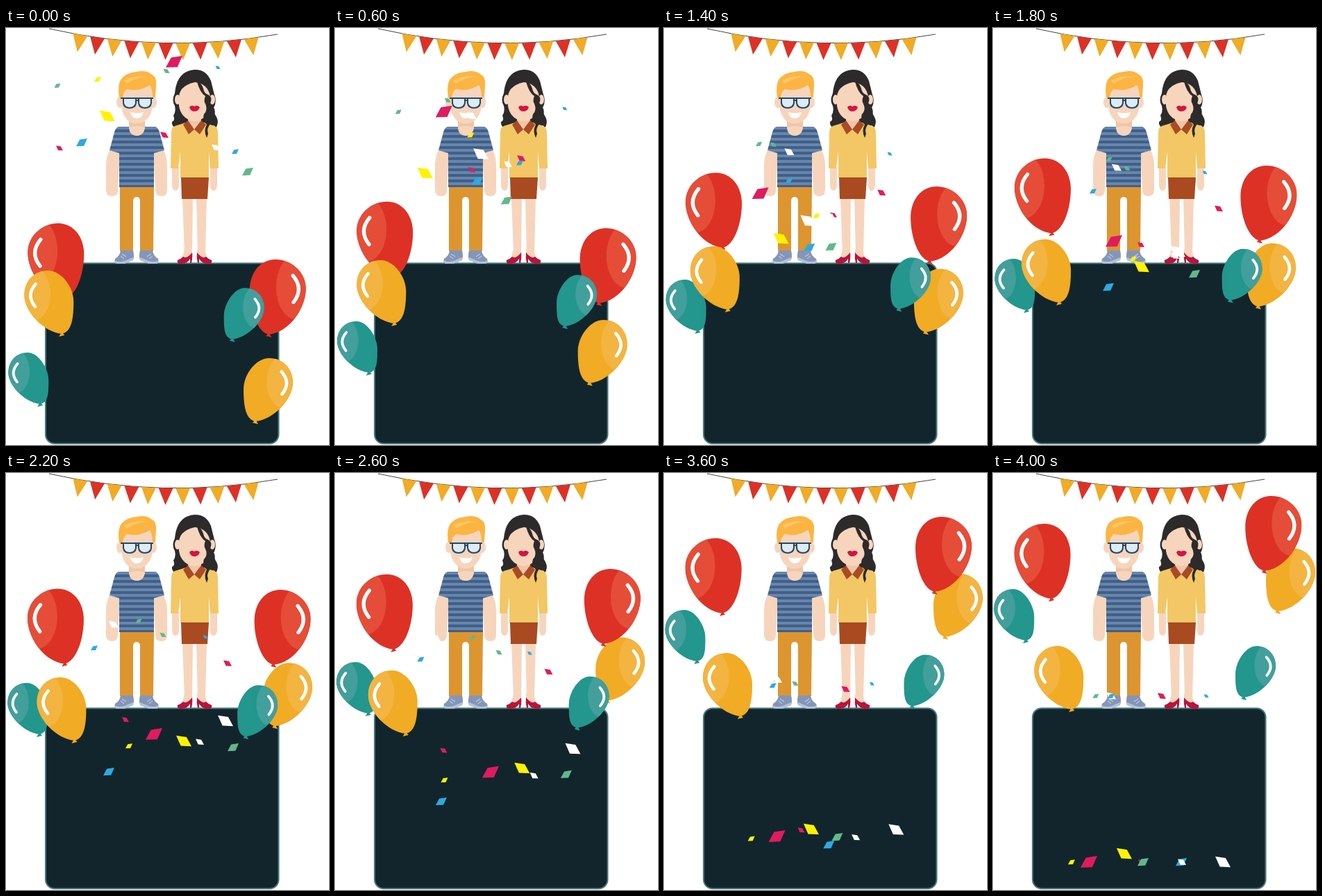
Animation, 465 px wide and 600 px high, one loop 4200 ms. Source, as an HTML page:

```html
<!DOCTYPE html>
<html lang="en">
<head>
<meta charset="utf-8">
<title>Party</title>
<style>
  html, body { margin: 0; width: 100%; height: 100%; overflow: hidden; background: #fff; }
  svg { display: block; }
</style>
</head>
<body>
<svg id="stage" width="465" height="600" viewBox="0 0 465 600">
  <defs>
    <pattern id="stripes" y="142" width="8" height="8" patternUnits="userSpaceOnUse">
      <path fill="#6686ae" d="M0 0h8v8H0z"/>
      <path fill="#425f86" d="M0 4h8v4H0z"/>
    </pattern>
    <g id="sneaker">
      <path fill="#8496b8" d="M165 320H183Q185 328 183 334L170 339H160Q155 338 157 332Q164 328 165 320Z"/>
      <path fill="#b5c1d8" d="M156 334Q162 338 171 335L183 330V334L171 339H160Q156 339 156 334Z"/>
      <path fill="none" stroke="#d5ddea" d="M167 325l6 4M165 328l5 4"/>
    </g>
    <g id="pump">
      <path fill="#f7d5bd" d="M257 318H268V328L261 335L253 333Z"/>
      <path fill="#b8143b" d="M268 323Q269 331 267 338H265V332Q261 339 254 339H249Q246 338 247 334Q251 333 255 329Q260 333 268 323Z"/>
    </g>
  </defs>

  <g id="banner"></g>
  <rect x="57" y="338.5" width="335.5" height="259.5" rx="13" fill="#12252d" stroke="#4a7b7b" stroke-width="2"/>

  <g id="man">
    <g fill="#f7d5bd">
      <path d="M149 176Q144 186 144 198V233Q144 242 153 242Q161 242 161 233L164 178Z"/>
      <path d="M227 176Q232 186 232 198V233Q232 242 224 242Q215 242 215 233L212 178Z"/>
    </g>
    <path fill="#dd9530" d="M164 227H213L212 321H193V249Q193 243 188 243Q183 243 183 249V321H164Z"/>
    <path fill="url(#stripes)" d="M162 142H215Q219 143 221 150L228 176L213 180V229H163V180L149 176L156 150Q158 143 162 142Z"/>
    <path fill="#f0c6a6" d="M177 128H200V144Q198 155 188 155Q178 155 177 144Z"/>
    <path fill="#f7d5bd" d="M177 143Q188 139 200 143Q198 155 188 155Q179 155 177 143Z"/>
    <g fill="#f7d5bd">
      <ellipse cx="164" cy="107" rx="5" ry="8"/>
      <ellipse cx="212" cy="107" rx="5" ry="8"/>
      <path d="M166 82H211V112Q209 130 196 136Q188 139 180 136Q168 130 166 112Z"/>
    </g>
    <path fill="#fcb542" d="M163 100Q160 80 167 72Q174 64 188 63Q202 60 210 67Q217 70 216 82L215 100L211 99Q211 88 207 82Q193 92 174 88Q169 91 168 100Z"/>
    <path fill="#fdc765" d="M170 76Q184 67 204 70Q190 70 174 80Z"/>
    <g fill="#dcecf2" stroke="#24486a" stroke-width="2">
      <path d="M169 101H187V108Q186 115 178 115Q170 115 169 108Z"/>
      <path d="M191 101H209V108Q208 115 200 115Q192 115 191 108Z"/>
      <path d="M165 101H212M187 105Q189 103 191 105"/>
    </g>
    <path fill="#fff" d="M179 121Q188 124 198 121Q196 130 188 130Q181 130 179 121Z"/>
    <use href="#sneaker"/>
    <use href="#sneaker" transform="matrix(-1 0 0 1 376 0)"/>
  </g>

  <g id="woman">
    <path fill="#2d2a2b" d="M271 60Q288 59 295 76L300 96Q304 105 299 115Q299 122 303 128Q307 136 302 143Q299 137 295 144H247Q238 143 239 135Q244 133 241 126Q245 121 243 112Q238 104 243 94Q246 62 271 60Z"/>
    <g fill="#f7d5bd">
      <path d="M239 200H249V228Q248 234 244 234Q239 233 239 226Z"/>
      <path d="M294 200H304V226Q304 233 299 234Q295 234 294 228Z"/>
      <path d="M254 244H269L268 325H257Z"/>
      <path d="M274 244H289L287 325H276Z"/>
    </g>
    <path fill="#f3c765" d="M259 136H285L300 141Q305 143 305 151L306 202H294L292 178V216H251V178L248 202H237L238 151Q238 143 243 141Z"/>
    <path fill="#a94a21" d="M252 215H292L290 246H253Z"/>
    <path fill="#f0c6a6" d="M262 125H281V136L271 147L262 136Z"/>
    <path fill="#a84b27" d="M262 133L271 146L263 153L255 139ZM281 133L271 146L279 153L288 139Z"/>
    <g fill="#f7d5bd">
      <ellipse cx="247" cy="103" rx="4" ry="7"/>
      <ellipse cx="297" cy="103" rx="4" ry="7"/>
      <path d="M249 99Q250 83 272 78Q291 80 294 99V112Q292 126 280 132Q271 136 263 132Q251 126 249 112Z"/>
    </g>
    <path fill="#2d2a2b" d="M275 77Q281 78 284 87Q285 94 291 96Q298 99 294 109Q303 116 300 125Q307 133 303 143Q299 138 295 137Q288 145 291 152L289 158Q284 148 289 139Q282 132 285 124Q291 118 287 109Q284 105 287 98Q279 93 275 77Z"/>
    <path fill="#d5143f" d="M264 114Q267 110 271 113Q275 110 279 114Q277 120 271 120Q266 120 264 114Z"/>
    <use href="#pump"/>
    <use href="#pump" transform="matrix(-1 0 0 1 543 0)"/>
  </g>

  <g id="balloons"></g>
  <g id="confetti"></g>
</svg>

<script>
const LOOP = 4200, STEP = 200;
const RED = '#dd3126', YELLOW = '#f1ab25', TEAL = '#23968d';
const LIGHT = { [RED]: '#e54d38', [YELLOW]: '#f3b441', [TEAL]: '#429f9b' };

function add(parent, tag, attrs) {
  const el = document.createElementNS('http://www.w3.org/2000/svg', tag);
  for (const key in attrs) el.setAttribute(key, attrs[key]);
  return parent.appendChild(el);
}
const byId = id => document.getElementById(id);

// Bunting: flags hang at right angles to a sagging string
function sag(x) {
  const u = (x - 62) / 329, v = 1 - u;
  return v * v + 76 * u * v + 9 * u * u;
}
const banner = byId('banner');
add(banner, 'path', { d: 'M62 1Q226.5 38 391 9', fill: 'none', stroke: '#444' });
for (let i = 0; i < 11; i++) {
  const x = 107 + i * 24.6, a = sag(x - 10.5), b = sag(x + 10.5);
  const slope = (b - a) / 21;
  add(banner, 'path', {
    d: `M${x - 10.5} ${a}L${x + 10.5} ${b}L${x - slope * 25} ${sag(x) + 24.5}Z`,
    fill: i % 2 ? RED : YELLOW
  });
}

// Balloons: size, top centre of the knot, then drift over 4 s
const SIZES = {
  [RED]: { w: 81, h: 108, top: .54, tip: .66, side: .41 },
  [YELLOW]: { w: 71, h: 91, top: .48, tip: .76, side: .49 },
  [TEAL]: { w: 58, h: 74, top: .48, tip: .79, side: .54 }
};
const balloons = [
  { color: RED, x: 31.3, y: 281, dx: -.7, dy: -208 },
  { color: TEAL, x: 3.3, y: 467, dx: -2, dy: -300 },
  { color: YELLOW, x: 26.3, y: 349, dx: 33, dy: -100 },
  { color: YELLOW, x: 342, y: 475, dx: 51, dy: -367, flip: true },
  { color: RED, x: 350.7, y: 333, dx: 12.5, dy: -300, flip: true },
  { color: TEAL, x: 313.7, y: 374, dx: 35.3, dy: -125, flip: true }
];

balloons.forEach((b, i) => {
  const { w, h, top, tip, side } = SIZES[b.color];
  const p = (x, y) => `${x * w} ${y * h} `;
  const body = `M${p(top, 0)}C${p(top + .27, 0)}${p(1, side - .23)}${p(1, side)}`
    + `C${p(1, side + .27)}${p(tip + .2, .97)}${p(tip, 1)}`
    + `C${p(tip - .38, .97)}${p(0, .64)}${p(0, .39)}`
    + `C${p(0, .17)}${p(top - .28, 0)}${p(top, 0)}Z`;
  b.el = add(byId('balloons'), 'g', {});
  const g = add(b.el, 'g', { transform: b.flip ? `matrix(-1 0 0 1 ${w} 0)` : '' });
  add(add(g, 'clipPath', { id: 'clip' + i }), 'path', { d: body });
  add(g, 'path', { d: `M${tip * w} ${h - 3}l-4 7l8 -2Z`, fill: b.color });
  add(g, 'path', { d: body, fill: b.color });
  add(g, 'ellipse', {
    cx: .17 * w, cy: .37 * h, rx: .36 * w, ry: .43 * h,
    fill: LIGHT[b.color], 'clip-path': `url(#clip${i})`
  });
  add(g, 'path', {
    d: `M${p(.23, .215)}Q${p(.03, .39)}${p(.22, .57)}`,
    fill: 'none', stroke: '#fff', 'stroke-width': w * .065, 'stroke-linecap': 'round'
  });
});

// Confetti: colour, half size (negative = mirrored), x,y at each key time.
// The last y is the floor unless given.
const KEYS = [0, 1000, 1800, 2200, 4000];
const PINK = '#e01b60', LEMON = '#fff200', BLUE = '#2fa9e0', GREEN = '#62b88a', WHITE = '#fff';
const near = [
  [PINK, -5, [77,173, 248,231, 213,312, 172,355, 214]],
  [GREEN, 8, [348,207, 211,279, 290,354, 327,395, 216]],
  [PINK, 12, [242,49, 124,174, 174,307, 213,376, 138]],
  [LEMON, -11, [146,127, 134,260, 214,344, 256,386, 189,548]],
  [BLUE, 8, [109,165, 239,263, 166,373, 148,430, 271]],
  [LEMON, 5, [132,74, 222,210, 202,332, 177,393, 113]],
  [WHITE, -11, [318,110, 173,229, 266,322, 316,357, 331]],
  [WHITE, -6, [302,172, 229,223, 262,328, 279,387, 272]]
];
const far = [
  [PINK, -6, [228,154, 292,211, 325,260, 319,274, 243]],
  [BLUE, -3.5, [305,57, 338,152, 305,208, 287,236, 307]],
  [GREEN, 4.5, [74,83, 108,145, 167,189, 191,213, 148]],
  [GREEN, -4.5, [231,62, 138,134, 193,202, 226,233, 170]],
  [WHITE, -7, [232,85, 180,153, 178,201, 155,218, 170]],
  [BLUE, 5, [330,178, 224,206, 144,235, 127,252, 170]]
];

function makePieces(list, floor) {
  return list.map(([fill, size, path]) => {
    const pts = path.length < 10 ? [...path, floor] : path;
    const s = Math.abs(size);
    const el = add(byId('confetti'), 'path', { fill, d: 'M-1 .65L-.35 -.55L1 -.75L.4 .6Z' });
    return {
      el, scale: `scale(${size} ${s})`,
      xs: pts.filter((_, i) => i % 2 === 0),
      ys: pts.filter((_, i) => i % 2)
    };
  });
}
const pieces = [...makePieces(far, 321), ...makePieces(near, 560)];

// Smooth curve through values at uneven key times
function spline(v, t) {
  const last = KEYS.length - 2;
  let i = 0;
  while (i < last && t >= KEYS[i + 1]) i++;
  const gap = k => KEYS[k + 1] - KEYS[k];
  const rate = k => (v[k + 1] - v[k]) / gap(k);
  const slope = k => k === 0 ? rate(0) : k > last ? rate(last)
    : (rate(k - 1) * gap(k) + rate(k) * gap(k - 1)) / (gap(k) + gap(k - 1));
  const d = gap(i), u = (t - KEYS[i]) / d, w = 1 - u;
  return v[i] * w * w * (1 + 2 * u) + v[i + 1] * u * u * (3 - 2 * u)
    + d * u * w * (slope(i) * w - slope(i + 1) * u);
}

function draw(now) {
  const t = Math.floor(now % LOOP / STEP) * STEP;
  for (const b of balloons) {
    const k = t / 4000;
    b.el.setAttribute('transform', `translate(${b.x + b.dx * k} ${b.y + b.dy * k})`);
  }
  for (const p of pieces) {
    p.el.setAttribute('transform', `translate(${spline(p.xs, t)} ${spline(p.ys, t)}) ${p.scale}`);
  }
}

let start;
function tick(now) {
  start ??= now;
  draw(now - start);
  requestAnimationFrame(tick);
}
draw(0);
requestAnimationFrame(tick);
</script>
</body>
</html>
```
